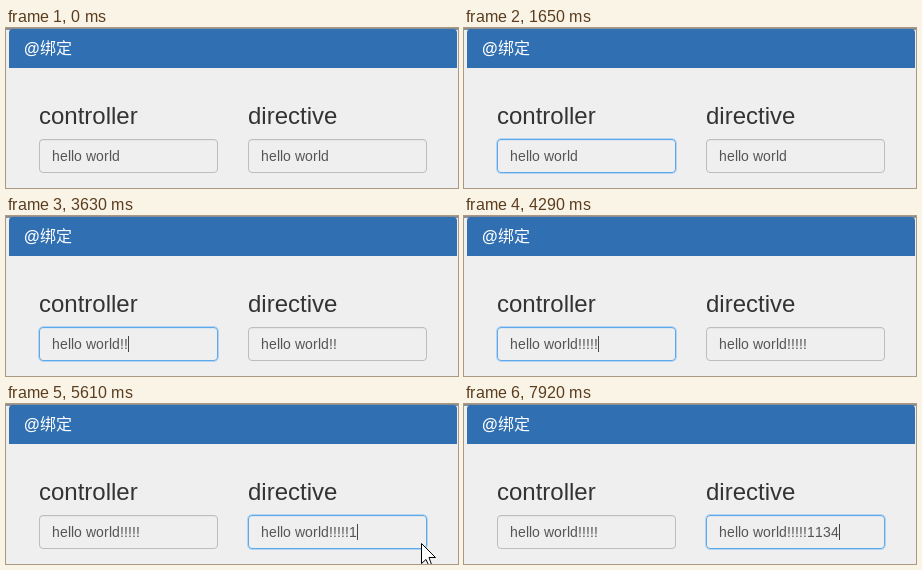
An HTML page with a canvas that plays this animation: 452x160 px, repeating every 8 s.

```html
<!DOCTYPE html>
<html lang="zh">
<head>
<meta charset="utf-8">
<title>@绑定</title>
<style>
  html, body { margin: 0; width: 100%; height: 100%; overflow: hidden; background: #efefef; }
  canvas { display: block; }
</style>
</head>
<body>
<canvas id="stage" width="452" height="160"></canvas>
<script>
const ctx = document.getElementById('stage').getContext('2d');
const LOOP = 8000, STEP = 330, BLINK = 480;
const SANS = '"Liberation Sans", Arial, sans-serif';
const CJK = '"Noto Sans CJK SC", "Noto Sans CJK", sans-serif';

// Times in ms; rate is characters per step.
const left = { x: 33, label: 'controller', click: 860, ring: 990, type: 3300, last: 4100, added: '!!!!!', rate: 1.4 };
const right = { x: 242, label: 'directive', click: 5200, ring: 5610, type: 5610, last: 6700, added: '1134', rate: 0.75 };

// The pointer takes one path point per step and rests on the last one.
const visits = [
  { from: 330, to: 1650, path: [[448, 150], [207, 136], [188, 134], [184, 135]] },
  { from: 4950, to: 7590, path: [[429, 143], [415, 139]] },
  { from: 7590, to: 7920, path: [[418, 140]] },
];

function typed({ type, added, rate }, t) {
  return t < type ? '' : added.slice(0, Math.round(1 + rate * (t - type) / STEP));
}

// Solid while typing, otherwise blinking since the latest input.
function caretOn({ click, type, last }, t) {
  if (t >= type && t < last) return true;
  const idle = t - (t < type ? click : last);
  return idle % (2 * BLINK) < BLINK;
}

function text(str, x, y, font, color) {
  ctx.font = font;
  ctx.fillStyle = color;
  ctx.fillText(str, x, y);
}

// Sets text on whole-pixel advances and returns its end.
function snappedText(str, x, y, font, color) {
  for (const ch of str) {
    text(ch, x, y, font, color);
    x += Math.round(ctx.measureText(ch).width);
  }
  return x;
}

function outline(x, y, w, h, r, color) {
  ctx.beginPath();
  ctx.roundRect(x + 0.5, y + 0.5, w - 1, h - 1, r);
  ctx.strokeStyle = color;
  ctx.stroke();
}

function header() {
  ctx.fillStyle = '#8b8f94';
  ctx.fillRect(0, 0, 452, 2);
  ctx.fillStyle = '#2f6fb2';
  ctx.beginPath();
  ctx.roundRect(3, 1, 448, 39, [4, 4, 0, 0]);
  ctx.fill();
  text('@', 18, 26, `bold 16px ${SANS}`, '#fff');
  text('绑定', 34, 26, `300 16px ${CJK}`, '#fff');
}

function field({ x, label }, value, ringed, caret) {
  text(label, x, 96, `24px ${SANS}`, '#333');
  if (ringed) outline(x - 1, 110, 181, 36, 4.5, '#b4d6f4');
  ctx.fillStyle = ringed ? '#dfe7ee' : '#e6e6e6';
  ctx.fillRect(x + 2, 112, 175, 1);
  outline(x, 111, 179, 34, 3.5, ringed ? '#5ea8e8' : '#bdbdbd');
  const end = snappedText(value, x + 13, 133, `14px ${SANS}`, '#555');
  if (caret) {
    ctx.fillStyle = '#444';
    ctx.fillRect(end, 120, 1, 16);
  }
}

function arrow([x, y]) {
  const points = [[0, 0], [0, 20], [4.5, 16], [8, 23.5], [10.5, 22.5], [7.5, 14], [14, 14]];
  ctx.beginPath();
  for (const [dx, dy] of points) ctx.lineTo(x + dx + 0.5, y + dy + 0.5);
  ctx.closePath();
  ctx.fillStyle = '#fff';
  ctx.fill();
  ctx.strokeStyle = '#000';
  ctx.lineJoin = 'round';
  ctx.stroke();
}

function draw(time) {
  const t = Math.floor((time % LOOP) / STEP) * STEP;
  const latest = key => [right, left].find(f => t >= f[key]);
  const ringed = latest('ring'), active = latest('click');
  const value = 'hello world' + typed(left, t);

  ctx.fillStyle = '#efefef';
  ctx.fillRect(0, 0, 452, 160);
  header();
  field(left, value, ringed === left, active === left && caretOn(left, t));
  field(right, value + typed(right, t), ringed === right, active === right && caretOn(right, t));

  const visit = visits.find(v => t >= v.from && t < v.to);
  if (visit) arrow(visit.path[Math.min((t - visit.from) / STEP, visit.path.length - 1)]);
}

function tick() {
  draw(performance.now());
  requestAnimationFrame(tick);
}
tick();
</script>
</body>
</html>
```
